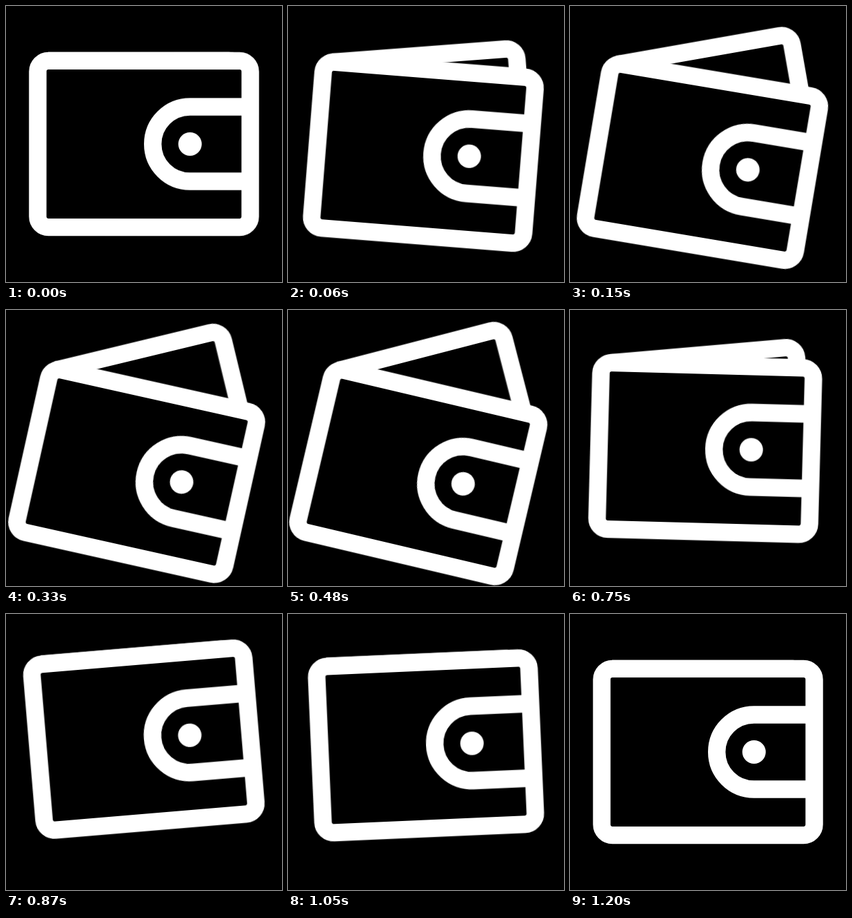
These frames come from a looping animation (400 px wide and 400 px high, 3.23 s). An HTML page:

```html
<!DOCTYPE html>
<html lang="en">
<head>
<meta charset="utf-8">
<title>Wallet</title>
<style>
  html, body {
    margin: 0;
    width: 100%;
    height: 100%;
    overflow: hidden;
    background: #000;
  }
  svg {
    display: block;
    width: 100%;
    height: 100%;
  }
  .line {
    fill: none;
    stroke: #fff;
    stroke-width: 25.4;
  }
  .case { fill: #000; }
  .dot { fill: #fff; }

  .wallet, .card, .slide {
    animation: 3230ms linear infinite;
  }
  .wallet {
    transform-origin: 200px 200px;
    animation-name: tilt;
  }
  /* The card swings on the centre of the wallet's top left corner. */
  .card {
    transform-origin: 61px 95px;
    animation-name: swing;
  }
  .slide { animation-name: slide; }

  /* tilt back, whip past level, settle */
  @keyframes tilt {
    0% {
      transform: translate(0, 0) rotate(0deg);
      animation-timing-function: cubic-bezier(.167, .167, 0, 1);
    }
    16.718% {
      transform: translate(-11.2px, 36.8px) rotate(13.3deg);
      animation-timing-function: cubic-bezier(.4, 0, .6, 1);
    }
    27.864% {
      transform: translate(0, -19.4px) rotate(-5.05deg);
      animation-timing-function: cubic-bezier(.333, 0, .667, 1);
    }
    37.152%, 100% { transform: translate(0, 0) rotate(0deg); }
  }
  @keyframes swing {
    0% {
      transform: rotate(0deg);
      animation-timing-function: cubic-bezier(.167, .167, 0, 1);
    }
    17.647% {
      transform: rotate(-28deg);
      animation-timing-function: cubic-bezier(.333, 0, .667, 1);
    }
    25.79%, 100% { transform: rotate(0deg); }
  }
  @keyframes slide {
    0% {
      transform: translateX(0);
      animation-timing-function: cubic-bezier(.167, .167, 0, 1);
    }
    17.647% {
      transform: translateX(-34.5px);
      animation-timing-function: cubic-bezier(.333, 0, .667, 1);
    }
    25.79%, 100% { transform: translateX(0); }
  }
</style>
</head>
<body>
<svg viewBox="0 0 400 400">
  <clipPath id="hinge"><rect x="61" y="0" width="340" height="400"/></clipPath>
  <g class="wallet">
    <g class="card" clip-path="url(#hinge)">
      <path class="line slide" d="M61 79.4H322.9a15.5 15.5 0 0 1 15.5 15.5V210"/>
    </g>
    <rect class="line case" x="46" y="79.4" width="308" height="241.2" rx="15.5"/>
    <path class="line" d="M354 146H266.7a54 54 0 0 0 0 108H354"/>
    <circle class="dot" cx="266.7" cy="200" r="17"/>
  </g>
</svg>
</body>
</html>
```
